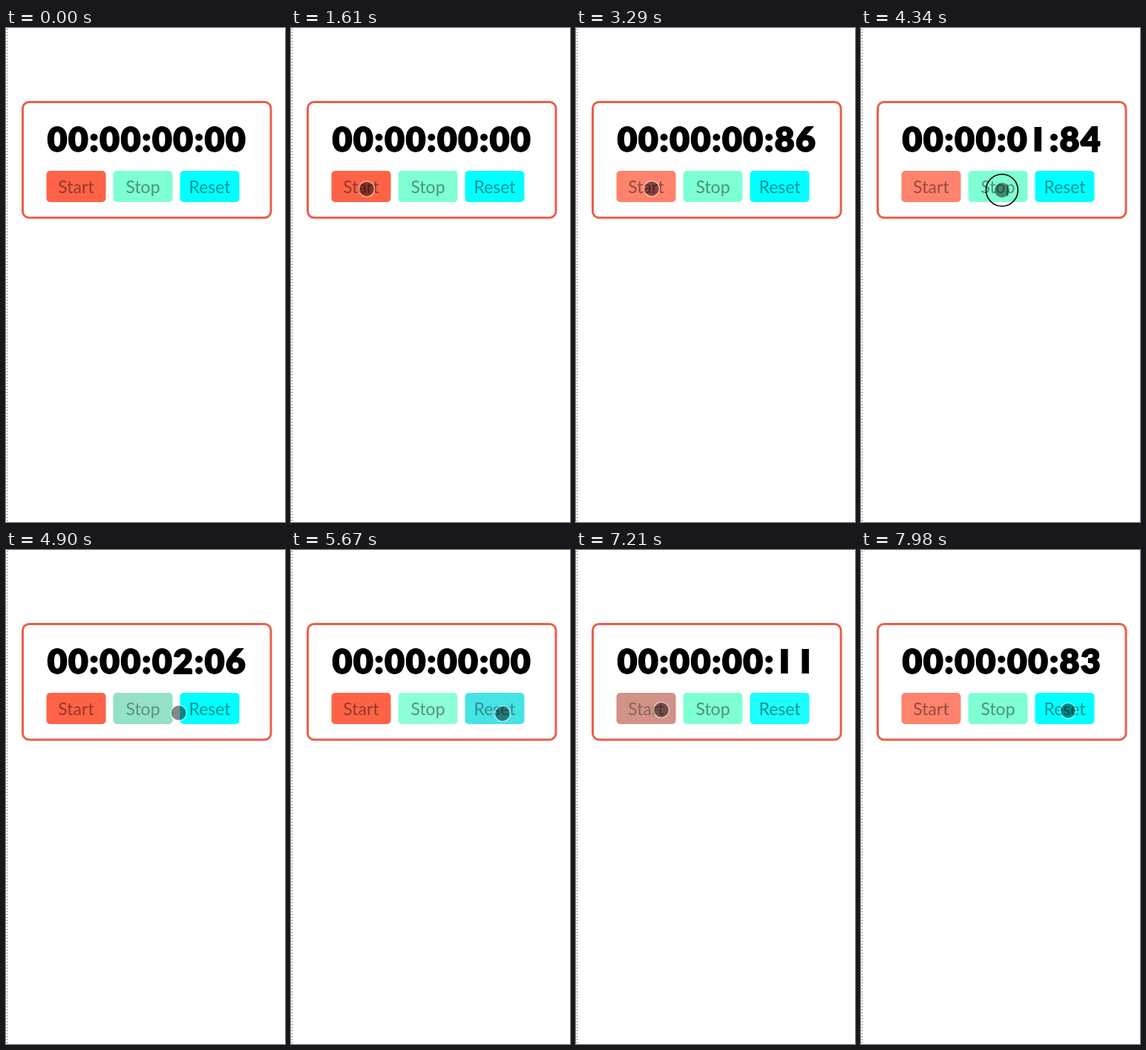
An HTML page with a canvas that plays this animation: 376 by 664 pixels, repeating every 8 s.

```html
<!DOCTYPE html>
<html lang="en">
<head>
<meta charset="utf-8">
<title>Stopwatch</title>
<style>
  html, body { margin: 0; width: 100%; height: 100%; overflow: hidden; background: #fff; }
  canvas { display: block; }
</style>
</head>
<body>
<canvas id="stage" width="376" height="664"></canvas>
<script>
const ctx = document.getElementById('stage').getContext('2d');
const LOOP = 8000, STEP = 70;
const TRAVEL = 600;      // pointer travel time between stops
const HOLD = 140;        // how long a press lasts
const RESPONSE = 302;    // from press to the clock reacting
const COUNT_RATE = 0.0936; // hundredths per millisecond

const buttons = [
  { label: 'Start', rgb: [255, 99, 71] },
  { label: 'Stop', rgb: [127, 255, 212] },
  { label: 'Reset', rgb: [0, 255, 255] }
];

// The pointer enters from below, then travels from stop to stop
const entry = { x: 150, y: 633, time: 70 };
const stops = [
  { leave: 70, x: 108, y: 252 },
  { leave: 1050, x: 102, y: 216, label: 'Start', press: 2067 },
  { leave: 3430, x: 190, y: 218, label: 'Stop', press: 4270 },
  { leave: 4620, x: 285, y: 220, label: 'Reset', press: 5360 },
  { leave: 5950, x: 115, y: 215, label: 'Start', press: 6790 },
  { leave: 7350, x: 279, y: 216 }
];
const presses = stops.filter(s => s.press);

const clamp = v => Math.max(0, Math.min(1, v));
const mix = (a, b, k) => a + (b - a) * k;
const smooth = k => k * k * (3 - 2 * k);

function pointerAt(t) {
  return stops.reduce((from, to) => {
    const k = smooth(clamp((t - to.leave) / TRAVEL));
    return { x: mix(from.x, to.x, k), y: mix(from.y, to.y, k) };
  }, entry);
}

function clockAt(t) {
  let total = 0, startedAt = null;
  for (const { label, press } of presses) {
    const time = press + RESPONSE;
    if (time > t) break;
    if (label === 'Start') startedAt = time;
    if (label === 'Stop') {
      total = (time - startedAt) * COUNT_RATE;
      startedAt = null;
    }
    if (label === 'Reset') total = 0;
  }
  const running = startedAt !== null;
  if (running) total = (t - startedAt) * COUNT_RATE;
  return { running, total: Math.floor(total) };
}

// A released button swells to grey, fades, and stays slightly pale for a while
function feedbackAt(label, t) {
  const last = presses.filter(p => p.label === label && t >= p.press + HOLD).pop();
  if (!last) return { grey: 0, pale: 0 };
  const age = t - last.press - HOLD;
  return {
    grey: 0.55 * clamp(Math.min(age / 310, (700 - age) / 350)),
    pale: age < 1900 ? 0.11 : 0
  };
}

function roundRect(x, y, w, h, r) {
  ctx.beginPath();
  ctx.roundRect(x, y, w, h, r);
}

function circle(x, y, r) {
  ctx.beginPath();
  ctx.arc(x, y, r, 0, 2 * Math.PI);
}

function drawCard() {
  ctx.fillStyle = '#fff';
  ctx.fillRect(0, 0, 376, 664);
  ctx.fillStyle = '#888';
  for (let y = 1; y < 664; y += 4) ctx.fillRect(1, y, 1, 2);
  ctx.strokeStyle = '#e8604a';
  ctx.lineWidth = 3;
  roundRect(22.5, 99.5, 334.5, 155.5, 8.5);
  ctx.stroke();
}

function drawClock(total) {
  const groups = [0, 0, Math.floor(total / 100), total % 100];
  const heavyText = (text, x) => {
    ctx.fillText(text, x, 165.8);
    ctx.strokeText(text, x, 165.8);
  };
  ctx.fillStyle = ctx.strokeStyle = '#000';
  ctx.lineWidth = 1.8;
  ctx.font = '900 46px Lato, sans-serif';
  groups.forEach((value, g) => {
    const left = 69 + g * 70.7;
    [...String(value).padStart(2, '0')].forEach((digit, i) => {
      const x = left + i * 28.3;
      if (digit === '1') ctx.fillRect(x - 5, 133, 9.5, 33);
      else heavyText(digit, x);
    });
    if (g < 3) heavyText(':', left + 49.6);
  });
}

function drawButton({ label, rgb }, index, t, running) {
  const x = 54.5 + index * 90;
  const { grey, pale } = feedbackAt(label, t);
  const fade = label === 'Start' && running ? 0.2 : pale;
  const color = rgb.map(c => Math.round(mix(mix(c, 255, fade), 163, grey)));
  ctx.fillStyle = `rgb(${color})`;
  roundRect(x, 192, 80, 42, 5);
  ctx.fill();
  ctx.fillStyle = `rgba(0, 0, 0, ${0.42 - 0.2 * grey})`;
  ctx.font = '23px Lato, sans-serif';
  ctx.fillText(label, x + 40, 221.5);
}

function drawPointer(t) {
  if (t < entry.time) return;
  const { x, y } = pointerAt(t);
  const pressed = presses.some(p => t >= p.press && t < p.press + HOLD);
  ctx.fillStyle = 'rgba(0, 0, 0, 0.47)';
  circle(x, y, 10);
  ctx.fill();
  ctx.strokeStyle = pressed ? '#000' : 'rgba(255, 255, 255, 0.45)';
  ctx.lineWidth = 1.6;
  circle(x, y, pressed ? 21.5 : 10.5);
  ctx.stroke();
}

function draw(now) {
  const t = Math.floor((now % LOOP) / STEP) * STEP;
  const { running, total } = clockAt(t);
  ctx.textAlign = 'center';
  drawCard();
  drawClock(total);
  buttons.forEach((button, i) => drawButton(button, i, t, running));
  drawPointer(t);
  requestAnimationFrame(draw);
}
requestAnimationFrame(draw);
</script>
</body>
</html>
```
